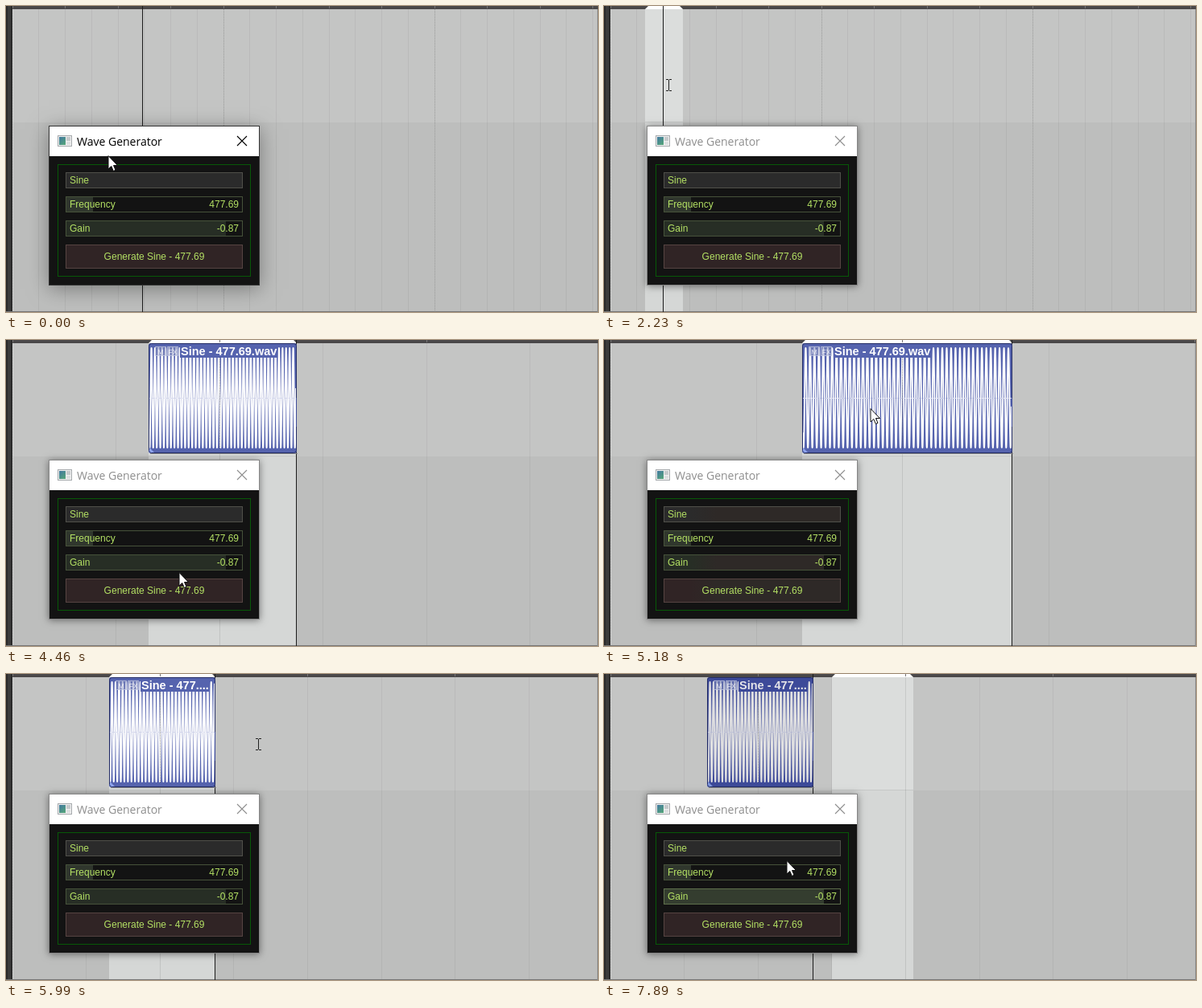
Animation, 735 px wide and 381 px high, one loop 8 s. Source, as an HTML page with a canvas:

```html
<!DOCTYPE html>
<html>
<head>
<meta charset="utf-8">
<style>
  html, body { margin: 0; width: 100%; height: 100%; overflow: hidden; background: #c4c5c4; }
  canvas { display: block; }
</style>
</head>
<body>
<canvas id="stage" width="735" height="381"></canvas>
<script>
const ctx = document.getElementById('stage').getContext('2d');
const W = 735, H = 381, LOOP = 8000;
const LEFT = 8, BEAT = 32.75, SPLIT = 145;
const WIN = { x: 53, y: 149, w: 262, h: 199 };
const ARIAL = '"Liberation Sans", Arial, sans-serif';
const LIME = '#b4e164';

// Bursts of screen updates: start, end, interval
const BURSTS = [
  [150, 270, 120], [550, 820, 135], [1100, 1920, 136], [2230, 3230, 142],
  [3380, 4340, 120], [4460, 5450, 120], [5600, 6390, 130], [6690, 7200, 127], [7500, 7890, 130]
];
const CURSOR = [
  [0, 127, 187], [149, 127, 187], [270, 54, 69], [550, 57, 69], [820, 98, 75],
  [1100, 95, 80], [1916, 79, 98], [3224, 82, 100], [3380, 130, 180], [3620, 205, 317],
  [4340, 205, 317], [4460, 215, 290], [5180, 331, 86], [5450, 331, 86], [5730, 337, 86],
  [5990, 313, 87], [6380, 284, 116], [6690, 292, 118], [7198, 384, 121],
  [7500, 345, 165], [7760, 216, 274], [7890, 227, 233]
];
const ZOOM = [[2230, 1], [3224, 3.925], [4460, 3.925], [5180, 5.54], [5730, 5.54], [5990, 2.798]];
const SELECT_A = [[550, 57], [820, 98]];
const SELECT_B = [[6690, 112], [7198, 142.4]];

function snap(t) {
  let shown = 0;
  for (const [start, end, gap] of BURSTS) {
    if (t < start) break;
    shown = start + Math.floor((Math.min(t, end) - start) / gap) * gap;
  }
  return shown;
}

function sample(keys, t) {
  if (t <= keys[0][0]) return keys[0].slice(1);
  for (let i = 1; i < keys.length; i++) {
    const a = keys[i - 1], b = keys[i];
    if (t < b[0]) {
      const p = (t - a[0]) / (b[0] - a[0]);
      return a.slice(1).map((v, j) => v + (b[j + 1] - v) * p);
    }
  }
  return keys[keys.length - 1].slice(1);
}

function rect(x, y, w, h, color) {
  ctx.fillStyle = color;
  ctx.fillRect(x, y, w, h);
}

function frame(x, y, w, h, color) {
  ctx.strokeStyle = color;
  ctx.lineWidth = 1;
  ctx.strokeRect(x + .5, y + .5, w - 1, h - 1);
}

function text(str, x, y, font, color, align = 'left') {
  ctx.font = font;
  ctx.fillStyle = color;
  ctx.textAlign = align;
  ctx.fillText(str, x, y);
}

function polygon(points, fill) {
  ctx.beginPath();
  points.forEach(([x, y]) => ctx.lineTo(x, y));
  ctx.closePath();
  ctx.fillStyle = fill;
  ctx.fill();
}

function dottedLine(x, y0, y1, color) {
  ctx.setLineDash([1, 1]);
  ctx.strokeStyle = color;
  ctx.lineWidth = 1;
  ctx.beginPath();
  ctx.moveTo(x + .5, y0);
  ctx.lineTo(x + .5, y1);
  ctx.stroke();
  ctx.setLineDash([]);
}

function drawTracks(zoom, sel) {
  rect(0, 0, W, SPLIT, '#c4c5c4');
  rect(0, SPLIT, W, H - SPLIT, '#bdbebd');
  rect(0, 0, W, 4, '#4a4849');
  if (sel) {
    const [x0, x1] = sel, w = x1 - x0;
    rect(x0, 4, w, SPLIT - 4, '#dbdddc');
    rect(x0, SPLIT, w, H - SPLIT, '#d5d7d6');
    rect(x0, SPLIT - 1, w, 1, '#c6c8c7');
    polygon([[x0, 4], [x0 + 4, 0], [x1 - 4, 0], [x1, 4]], '#fff');
  }
  for (let k = 0; LEFT + k * BEAT * zoom < W; k++) {
    const x = Math.floor(LEFT + k * BEAT * zoom);
    const inside = sel && x > sel[0] && x < sel[1];
    if (k % 2 === 0) rect(x, 0, 1, 3, '#777576');
    if (k % 8 === 0) dottedLine(x, 4, H, '#999a99');
    else rect(x, 4, 1, H, inside ? 'rgba(0,0,0,.09)' : 'rgba(0,0,0,.05)');
  }
  rect(0, 0, 8, H, '#3b3b3b');
  rect(0, 0, 2, H, '#292929');
  rect(6, 0, 2, H, '#2b2b2b');
  dottedLine(8, 4, H, '#e2e2e2');
  rect(0, H - 1, W, 1, '#777');
  rect(W - 1, 4, 1, H, '#8a8a8a');
}

function fitLabel(label, room) {
  if (ctx.measureText(label).width <= room) return label;
  while (label && ctx.measureText(label + '....').width > room) label = label.slice(0, -1);
  return label + '....';
}

function drawItem(x0, x1, zoom, lit) {
  const w = x1 - x0, blue = lit ? '#5563ae' : '#3d4a99', pale = lit ? '#fff' : '#e0e0e1';
  rect(x0 + 2, 141, w - 1, 1, '#85868a');
  ctx.save();
  ctx.beginPath();
  ctx.roundRect(x0, 4, w, 137, 3);
  ctx.fillStyle = blue;
  ctx.fill();
  ctx.clip();
  const period = zoom > 4.5 ? 5.47 : 4.4;
  ctx.strokeStyle = pale;
  ctx.lineWidth = 1.9;
  ctx.lineJoin = 'round';
  ctx.beginPath();
  for (let x = 1; x < w - 1; x += .1) {
    ctx.lineTo(x0 + x, 72 - 62 * Math.sin((x / period + .44) * Math.PI * 2));
  }
  ctx.stroke();
  ctx.setLineDash([2, 1]);
  ctx.strokeStyle = lit ? '#d9dcef' : '#c4c7db';
  ctx.lineWidth = 1;
  ctx.beginPath();
  ctx.moveTo(x0, 72.5);
  ctx.lineTo(x1, 72.5);
  ctx.stroke();
  ctx.setLineDash([]);
  const mid = Math.floor(LEFT + 2 * BEAT * zoom);
  dottedLine(mid, 22, 135, 'rgba(90,90,90,.65)');

  const font = 'bold 14.5px ' + ARIAL;
  ctx.font = font;
  const label = fitLabel('Sine - 477.69.wav', w - 45);
  rect(x0 + 39, 7, ctx.measureText(label).width + 2, 15, blue);
  text(label, x0 + 40, 19, font, lit ? '#fff' : '#e4e4e8');
  for (const [dx, tag] of [[8, 'M'], [23, 'FX']]) {
    rect(x0 + dx, 8, 14, 12, 'rgba(130,140,190,.5)');
    frame(x0 + dx, 8, 14, 12, 'rgba(225,228,240,.55)');
    text(tag, x0 + dx + 7, 18, '9px ' + ARIAL, 'rgba(255,255,255,.75)', 'center');
  }
  polygon([[x0, 133], [x0 + 8, 141], [x0, 141]], lit ? '#8fa5ef' : '#7f97dd');
  ctx.restore();
  ctx.strokeStyle = '#242d66';
  ctx.lineWidth = 1;
  ctx.beginPath();
  ctx.roundRect(x0 + .5, 4.5, w - 1, 136, 3);
  ctx.stroke();
}

function drawField(y, h, fill, edge, level, levelColor, blend) {
  rect(74, y, 220, h, fill);
  if (level) rect(74, y, level, h, levelColor);
  if (blend) {
    const tint = ctx.createLinearGradient(108, 0, 140, 0);
    tint.addColorStop(0, 'rgba(46,41,39,0)');
    tint.addColorStop(1, 'rgb(46,41,39)');
    rect(74, y, level || 220, h, tint);
  }
  frame(74, y, 220, h, edge);
}

function drawWindow({ active, buttonLit, gainLit, blend }) {
  const { x, y, w, h } = WIN;
  ctx.save();
  ctx.shadowColor = active ? 'rgba(0,0,0,.36)' : 'rgba(0,0,0,.45)';
  ctx.shadowBlur = active ? 24 : 9;
  ctx.shadowOffsetY = active ? 4 : 1;
  rect(x, y, w, h, '#131313');
  ctx.restore();
  rect(x, y, w, 38, '#fff');
  frame(x, y, w, h, active ? '#333' : '#868686');
  const ink = active ? '#000' : '#8e8e8e';
  text('Wave Generator', 88, 174, '14px "Open Sans", sans-serif', ink);
  ctx.strokeStyle = ink;
  ctx.lineWidth = 1.1;
  ctx.beginPath();
  ctx.moveTo(287, 162); ctx.lineTo(299, 174);
  ctx.moveTo(299, 162); ctx.lineTo(287, 174);
  ctx.stroke();

  rect(64, 161, 18, 14, '#f1f1f1');
  frame(64, 161, 18, 14, '#a5a9ac');
  const pane = ctx.createLinearGradient(66, 163, 74, 173);
  pane.addColorStop(0, '#4278a0');
  pane.addColorStop(1, '#55a777');
  rect(66, 163, 8, 10, pane);
  rect(75, 163, 5, 5, '#c5c9cb');
  rect(75, 169, 5, 4, '#dcdfe0');

  frame(64, 197, 240, 140, '#075807');
  drawField(207, 20, '#2b2b2b', '#50504a', 0, '', blend);
  drawField(237, 20, '#131313', '#46523a', 34, '#30372d', false);
  drawField(267, 20, '#131313', gainLit ? '#5f704c' : '#46523a', 199, gainLit ? '#343d2f' : '#272e25', blend);
  drawField(297, 30, buttonLit ? '#3b2d2d' : '#302425', buttonLit ? '#705453' : '#564442', 0, '', blend);
  const font = '12px ' + ARIAL;
  text('Sine', 79, 221, font, LIME);
  text('Frequency', 79, 251, font, LIME);
  text('477.69', 289, 251, font, LIME, 'right');
  text('Gain', 79, 281, font, LIME);
  text('-0.87', 289, 281, font, LIME, 'right');
  text('Generate Sine - 477.69', 184, 316, font, LIME, 'center');
}

function drawArrow(x, y) {
  const shape = [[0, 0], [0, 16.5], [3.8, 13], [6.4, 19], [9, 17.8], [6.5, 12], [11.5, 12]];
  ctx.save();
  ctx.translate(x, y - .5);
  polygon(shape, '#fff');
  ctx.strokeStyle = '#111';
  ctx.lineWidth = 1;
  ctx.stroke();
  ctx.restore();
}

function drawBeam(x, y) {
  rect(x, y - 6, 1, 13, '#222');
  for (const end of [y - 7, y + 7]) {
    rect(x - 3, end, 3, 1, '#222');
    rect(x + 1, end, 3, 1, '#222');
  }
}

function draw(time) {
  const t = snap(time);
  const [zoom] = sample(ZOOM, t);
  const toX = b => Math.round(LEFT + (b - LEFT) * zoom);
  const [cx, cy] = sample(CURSOR, t).map(Math.round);
  const later = t >= 6690, hasItem = t >= 4100;

  let sel = null;
  if (later) sel = [106.25, sample(SELECT_B, t)[0]];
  else if (t >= 550) sel = [51, sample(SELECT_A, t)[0]];
  sel = sel && sel.map(toX);

  drawTracks(zoom, sel);
  const head = hasItem ? 98 : t >= 1770 ? 73 : 169;
  rect(toX(head) - (hasItem ? 1 : 0), 0, 1, H, '#1c1c1c');
  const item = [toX(51), toX(98)];
  if (hasItem) {
    drawItem(...item, zoom, !later);
    rect(item[1] - 1, 72, 1, 36, '#3e4c9a');
  }

  drawWindow({
    active: t < 550,
    buttonLit: t >= 3620 && t < 4460,
    gainLit: t >= 7760,
    blend: t >= 4700 && t < 5860
  });

  const overWindow = cx >= WIN.x && cx < WIN.x + WIN.w && cy >= WIN.y && cy < WIN.y + WIN.h;
  const overItem = hasItem && cx >= item[0] && cx < item[1] && cy < 141;
  (overWindow || overItem ? drawArrow : drawBeam)(cx, cy);
}

const begin = performance.now();
function tick() {
  draw((performance.now() - begin) % LOOP);
  requestAnimationFrame(tick);
}
tick();
</script>
</body>
</html>
```
